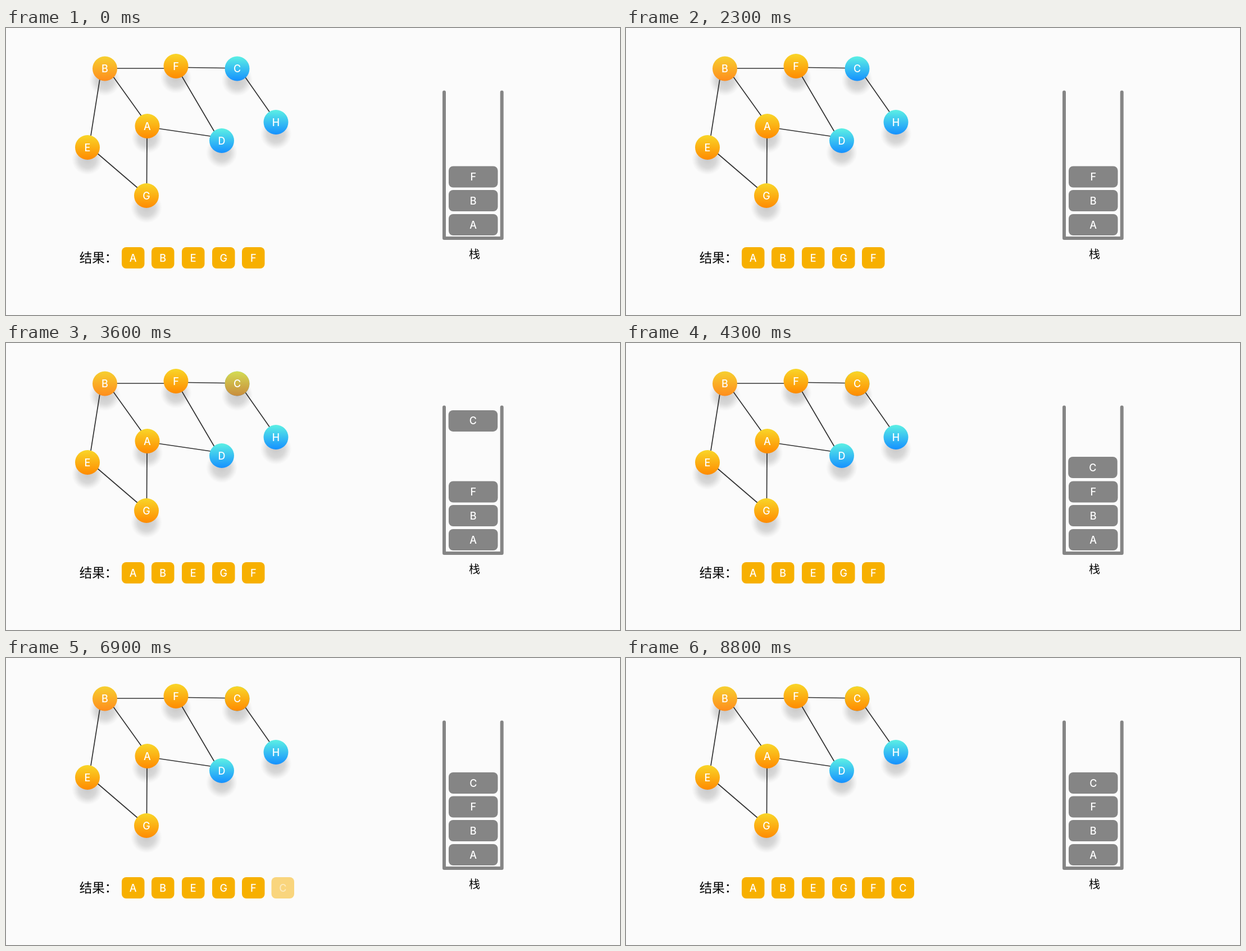
These frames come from a looping animation (1093x512 px, 8900 ms). An HTML page with a canvas:

```html
<!DOCTYPE html>
<html lang="zh">
<head>
<meta charset="utf-8">
<style>
html, body { margin: 0; width: 100%; height: 100%; overflow: hidden; background: #fbfbfb; }
canvas { display: block; }
</style>
</head>
<body>
<canvas id="stage" width="1093" height="512"></canvas>
<script>
const ctx = document.getElementById('stage').getContext('2d');
const LOOP = 8900;
const GRAY = '#858585';
const ORANGE = ['#f9d628', '#ff8a00'];
const BLUE = ['#5cf0e4', '#1590ff'];

const nodes = {
  A: [251.5, 175], B: [176, 72.5], C: [411.5, 72.5], D: [384, 201],
  E: [145, 213], F: [302.5, 68], G: [250, 299], H: [480.5, 168]
};
const edges = [
  [196, 72, 282, 72], [324, 70.5, 391, 71.5], [167, 91, 151, 192],
  [191, 87, 241, 157], [251, 196, 250.5, 278], [272, 179.5, 364, 193],
  [313, 86, 371, 185], [426, 88, 470, 151], [163, 224, 234, 285]
];
const results = [['A', 206], ['B', 259], ['E', 313], ['G', 367], ['F', 420]];
const stack = [['A', 332], ['B', 289], ['F', 246.5]];

const progress = (t, start, end) => Math.min(1, Math.max(0, (t - start) / (end - start)));
const ease = p => (1 - Math.cos(Math.PI * p)) / 2;
const mix = (a, b, p) => a + (b - a) * p;

function label(text, x, y, font = '500 18px Inter, "Liberation Sans", sans-serif', color = '#fff') {
  ctx.font = font;
  ctx.fillStyle = color;
  ctx.textAlign = 'center';
  ctx.fillText(text, x, y);
}

function box(text, x, y, w, color, alpha = 1) {
  ctx.globalAlpha = alpha;
  ctx.fillStyle = color;
  ctx.beginPath();
  ctx.roundRect(x, y, w, 38, 8);
  ctx.fill();
  label(text, x + w / 2, y + 25.5);
  ctx.globalAlpha = 1;
}

function shadow(x, y) {
  const cy = y + 21;
  const g = ctx.createRadialGradient(x, cy, 0, x, cy, 28);
  g.addColorStop(0, 'rgba(0,0,0,.2)');
  g.addColorStop(0.55, 'rgba(0,0,0,.14)');
  g.addColorStop(0.85, 'rgba(0,0,0,.04)');
  g.addColorStop(1, 'rgba(0,0,0,0)');
  ctx.fillStyle = g;
  ctx.fillRect(x - 28, cy - 28, 56, 56);
}

function disc(x, y, [top, bottom], alpha = 1) {
  const g = ctx.createLinearGradient(0, y - 22, 0, y + 22);
  g.addColorStop(0, top);
  g.addColorStop(1, bottom);
  ctx.globalAlpha = alpha;
  ctx.fillStyle = g;
  ctx.beginPath();
  ctx.arc(x, y, 22, 0, Math.PI * 2);
  ctx.fill();
  ctx.globalAlpha = 1;
}

function drawGraph(visitC) {
  for (const [x, y] of Object.values(nodes)) shadow(x, y);
  ctx.strokeStyle = '#333';
  ctx.lineWidth = 1.7;
  ctx.beginPath();
  for (const [x1, y1, x2, y2] of edges) {
    ctx.moveTo(x1, y1);
    ctx.lineTo(x2, y2);
  }
  ctx.stroke();
  for (const [name, [x, y]] of Object.entries(nodes)) {
    const colors = name === 'B' ? ['#f6d030', '#ff8c1c'] : ORANGE;
    disc(x, y, 'CDH'.includes(name) ? BLUE : colors);
    if (name === 'C' && visitC > 0) disc(x, y, ORANGE, visitC);
    label(name, x, y + 6.8);
  }
}

function drawStack(t) {
  ctx.strokeStyle = GRAY;
  ctx.lineWidth = 6;
  ctx.lineCap = ctx.lineJoin = 'round';
  ctx.beginPath();
  ctx.moveTo(780, 114.5);
  ctx.lineTo(780, 375);
  ctx.lineTo(882.7, 375);
  ctx.lineTo(882.7, 114.5);
  ctx.stroke();
  ctx.lineCap = 'butt';
  for (const [name, y] of stack) box(name, 788, y, 87.5, GRAY);

  const settled = t >= 6400;
  const drop = ease(progress(t, 3200, 4100));
  const x = settled ? 788 : mix(788, 787.2, drop);
  const y = settled ? 204 : mix(61, 203, drop);
  box('C', x, y, 87.5, GRAY, progress(t, 2700, 3000));
}

function draw(t) {
  ctx.fillStyle = '#fbfbfb';
  ctx.fillRect(0, 0, 1093, 512);
  drawGraph(progress(t, 2950, 3800));
  drawStack(t);
  for (const [name, x] of results) box(name, x, 391, 40.5, '#f7b000');
  box('C', 472.5, 391, 40.5, '#f7b000', progress(t, 6400, 7400));
  label('结果：', 164.5, 418, '500 22.5px "Noto Sans CJK SC", "Noto Sans CJK", sans-serif', '#000');
  label('栈', 834, 410.5, '20px "Noto Sans CJK SC", "Noto Sans CJK", sans-serif', '#000');
}

const begin = performance.now();
function tick() {
  draw((performance.now() - begin) % LOOP);
  requestAnimationFrame(tick);
}
tick();
</script>
</body>
</html>
```
